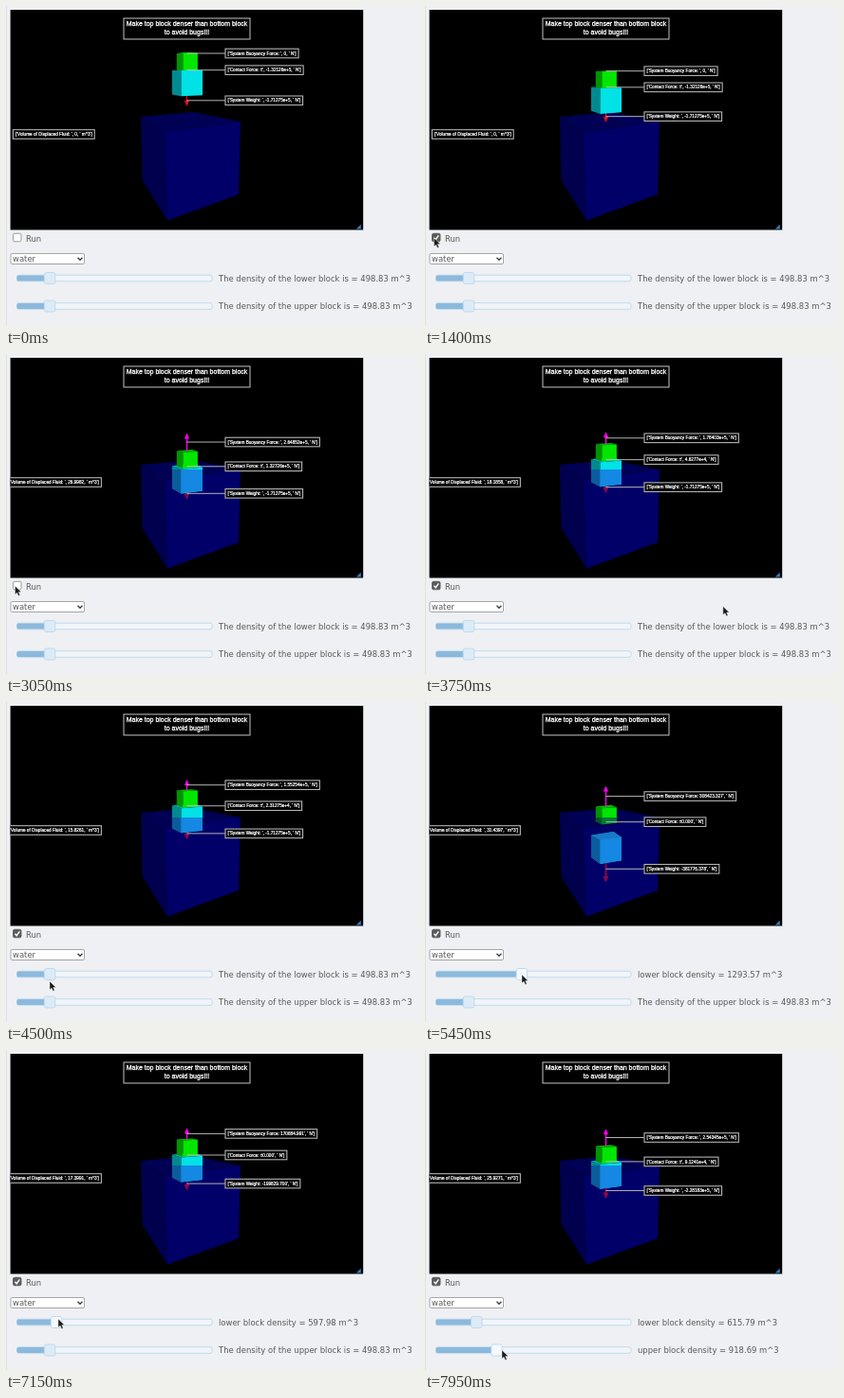
These frames come from a looping animation (435 px wide and 338 px high, 8000 ms). An HTML page:

```html
<!DOCTYPE html>
<html lang="en">
<head>
<meta charset="utf-8">
<title>Buoyancy of stacked blocks</title>
<style>
  html, body { margin: 0; width: 100%; height: 100%; overflow: hidden; background: #eff0f3; }
  svg { display: block; width: 100vw; height: 100vh; }
  .ui { font: 8.45px "DejaVu Sans", sans-serif; fill: #585858; white-space: pre; }
  .lab { font: 4.7px "Liberation Sans", sans-serif; fill: #fff; stroke: #fff; stroke-width: .24; }
  .title { font: 7px "Liberation Sans", sans-serif; fill: #fff; stroke: #fff; stroke-width: .3; text-anchor: middle; }
  .box { fill: #000; stroke: #b4b4b4; stroke-width: 1.1; }
</style>
</head>
<body>
<svg id="stage" viewBox="0 0 435 338">
  <defs>
    <clipPath id="view"><rect x="4.600" y="4" width="371.600" height="232.500"/></clipPath>
    <clipPath id="under"><rect x="5" y="122" width="371" height="115"/></clipPath>
  </defs>
  <rect width="435" height="338" fill="#eff0f3"/>
  <rect width="1" height="338" fill="#dfe0e4"/>
  <rect x="4.600" y="4" width="371.600" height="232.500"/>
  <g id="scene" clip-path="url(#view)">
    <path d="M142 117L197 112L247 122L167 133.500Z" fill="#000054"/>
    <path d="M142 117L167 133.500L170 226.500L143.500 184Z" fill="#00004e"/>
    <path d="M167 133.500L247 122L245 199L170 226.500Z" fill="#000068"/>
  </g>
  <path d="M368.800 235.500L373.800 230.700V235.500Z" fill="#2f7fc4"/>
  <g id="ui"></g>
</svg>
<script>
const LOOP = 8000, AXIS = 190.5, G = 9.81, BASE = 498.834;
const scene = document.getElementById('scene'), ui = document.getElementById('ui');

function el(parent, tag, attrs, text) {
  const e = document.createElementNS('http://www.w3.org/2000/svg', tag);
  set(e, attrs);
  if (text) e.textContent = text;
  parent.appendChild(e);
  return e;
}
function set(e, attrs) { for (const k in attrs) e.setAttribute(k, attrs[k]); }
const clamp = (v, a, b) => Math.max(a, Math.min(b, v));

const ease = {
  lin: p => p,
  cos: p => (1 - Math.cos(Math.PI * p)) / 2,
  fall: p => p * p,
  out: p => Math.sin(p * Math.PI / 2)
};
// keys: [time, value, easing into this key]
function at(keys, t, kind) {
  if (t <= keys[0][0]) return keys[0][1];
  for (let i = 1; i < keys.length; i++) {
    const [t1, b, e] = keys[i], [t0, a] = keys[i - 1];
    if (t < t1) return a + (b - a) * ease[e || kind]((t - t0) / (t1 - t0));
  }
  return keys[keys.length - 1][1];
}

// height of the lower block's top; a pause lies between 2450 and 3050
const depth = [[1140, 68], [1470, 97, 'fall'], [1750, 130, 'out'], [2140, 97], [2540, 122]];
const depthAfter = [[2740, 97], [3140, 122], [3520, 101], [3910, 118], [4300, 105], [4700, 114.96],
  [4950, 122], [5450, 142, 'fall'], [5900, 162, 'out'], [6430, 122, 'fall'], [6650, 99, 'out'],
  [6960, 118], [7350, 104.14], [7800, 121], [8150, 113.88]];
const lowerKeys = [[4750, BASE], [5350, 1293.57], [5550, 1293.57], [6400, 679], [6700, 679],
  [7150, 597.8], [7250, 615.79]];
const upperKeys = [[7720, BASE], [7950, 918.69]];
const cursorX = [[50, 378], [800, 13], [900, 13], [1000, 9.5], [3150, 9.5], [3850, 364], [4050, 390],
  [4450, 46], [4750, 46], [5350, 102], [5550, 102], [6400, 60], [6700, 60], [7150, 55], [7300, 55],
  [7600, 50], [7720, 50], [7950, 81]];
const cursorY = [[50, 289], [800, 246], [900, 246], [1000, 245], [3150, 245], [3850, 270], [4050, 310],
  [4450, 295], [4500, 295], [4720, 288], [5550, 288], [6400, 284], [7300, 284], [7600, 318], [7950, 317]];

const blockY = t => t < 3050 ? at(depth, Math.min(t, 2450), 'cos')
  : at(depthAfter, Math.max(t, 3050 + 0), 'cos');
const lowerAt = t => at(lowerKeys, t, 'lin');
const upperAt = t => at(upperKeys, t, 'lin');

function makeArrow(color, parent) { return el(parent, 'path', { fill: color }); }
function drawArrow(e, y, len) {
  const d = Math.sign(len), n = Math.abs(len);
  if (n < .3) return set(e, { d: '' });
  const tip = y + len, neck = tip - d * Math.min(6, n), w = 2.6;
  set(e, { d: `M${AXIS - .7} ${y}V${neck}H${AXIS - w}L${AXIS} ${tip}L${AXIS + w} ${neck}H${AXIS + .7}V${y}Z` });
}

function makeBlock(colors, wetColors, size) {
  const faces = (parent, cols) => cols.map(c => el(parent, 'path', { fill: c }));
  const dry = faces(scene, colors);
  const wet = faces(el(scene, 'g', { 'clip-path': 'url(#under)' }), wetColors);
  return { sets: [dry, wet], size };
}
function drawBlock({ sets, size }, top, bottom) {
  const corner = (dx, k, y) => `${AXIS + dx * size} ${y + (y - 70) * k * size}`;
  const left = y => corner(-15.5, -.02, y), front = y => corner(-6, .055, y);
  const right = y => corner(16.5, .014, y), back = y => corner(8, -.07, y);
  const shapes = [
    [left(top), back(top), right(top), front(top)],
    [left(top), front(top), front(bottom), left(bottom)],
    [front(top), right(top), right(bottom), front(bottom)]
  ];
  for (const s of sets) s.forEach((e, i) => set(e, { d: 'M' + shapes[i].join('L') + 'Z' }));
}

const weightArrow = makeArrow('#e0101c', scene);
const weightWet = makeArrow('#86094a', el(scene, 'g', { 'clip-path': 'url(#under)' }));
const lower = makeBlock(['#00b4b8', '#008a90', '#00e2e6'], ['#1a78c8', '#0b5c9c', '#1488e2'], 1);
const upper = makeBlock(['#00b800', '#009400', '#00e600'], ['#006a2c', '#005428', '#007a34'], .69);
const liftArrow = makeArrow('#ff00f0', scene);

function makeLabel(lead) {
  const line = lead && el(scene, 'path', { stroke: '#c8c8c8', 'stroke-width': .9 });
  return { line, box: el(scene, 'rect', { class: 'box', height: 9.6 }), text: el(scene, 'text', { class: 'lab' }) };
}
function drawLabel(l, y, str) {
  if (l.str !== str) {
    l.text.textContent = l.str = str;
    l.width = l.text.getComputedTextLength() + 5;
  }
  const x = l.line ? 231 : 50.3 - l.width / 2;
  set(l.box, { x, y: y - 4.8, width: l.width });
  set(l.text, { x: x + 2.5, y: y + 1.6 });
  if (l.line) set(l.line, { d: `M${AXIS} ${y}H231` });
}
const liftLabel = makeLabel(true), contactLabel = makeLabel(true), weightLabel = makeLabel(true);
const volumeLabel = makeLabel(false);
el(scene, 'rect', { class: 'box', x: 124, y: 13, width: 133, height: 22 });
el(scene, 'text', { class: 'title', x: 190.5, y: 21.2 }, 'Make top block denser than bottom block');
el(scene, 'text', { class: 'title', x: 190.5, y: 30 }, 'to avoid bugs!!!');

// controls
const check = el(ui, 'rect', { x: 7.5, y: 240.3, width: 8.5, height: 8.5, rx: 1.5, 'stroke-width': .9 });
const tick = el(ui, 'path', { d: 'M9.500 244.800L11.200 246.800L14.300 242.300', fill: 'none', stroke: '#fff', 'stroke-width': 1.4 });
el(ui, 'text', { class: 'ui', x: 21, y: 249.3 }, 'Run');
el(ui, 'rect', { x: 5, y: 261.5, width: 77.5, height: 11, rx: 1.5, fill: '#fff', stroke: '#9c9c9c', 'stroke-width': .9 });
el(ui, 'text', { class: 'ui', x: 7, y: 270 }, 'water');
el(ui, 'path', { d: 'M75.500 265.800L78 268.300L80.500 265.800', fill: 'none', stroke: '#3c3c3c', 'stroke-width': 1.3 });

function makeSlider(y) {
  el(ui, 'rect', { x: 11.5, y: y - 3.3, width: 205.5, height: 6.6, rx: 2, fill: '#f1f5f9', stroke: '#bdd8eb', 'stroke-width': .9 });
  return {
    y,
    fill: el(ui, 'rect', { x: 11.5, y: y - 3, height: 6, rx: 1.5, fill: '#8bb9dc' }),
    knob: el(ui, 'rect', { y: y - 6, width: 11.5, height: 12, rx: 2, stroke: '#bcd8ec', 'stroke-width': .9 }),
    text: el(ui, 'text', { class: 'ui', x: 224, y: y + 3.3 })
  };
}
function drawSlider(s, name, value, touched, active) {
  const x = 11 + value * .0703;
  set(s.fill, { width: x - 11.5 });
  set(s.knob, { x: x - 5.75, fill: active ? '#f4f9fd' : '#dcebf6' });
  s.text.textContent = (touched ? `${name} block density = ` : `The density of the ${name} block is = `)
    + value.toFixed(2) + ' m^3';
}
const lowerSlider = makeSlider(287.5), upperSlider = makeSlider(317);
const cursor = el(ui, 'path', {
  d: 'M0 0V9L2.100 7.200L3.600 10.400L5.200 9.700L3.800 6.600H6.600Z',
  fill: '#1c1c1c', stroke: '#fff', 'stroke-width': .4
});

const short = v => {
  const p = Number(v.toPrecision(6));
  if (Math.abs(p) < 1e4) return String(p);
  const [m, e] = p.toExponential().split('e+');
  return `${m}e+${e}`;
};

function render(t) {
  const yl = blockY(t), yu = Math.min(yl, 126.98);
  const rl = lowerAt(t - 50), ru = upperAt(t - 50);
  const volume = clamp((yl - 97.2) / .81, 0, 27) + clamp((yu - 119.1) / 1.7749, 0, 8);
  const lift = volume * 1000 * G, weight = G * (27 * rl + 8 * ru);
  const apart = rl > ru;

  const top = yu - 18 + .03 * (yu - 68);
  drawBlock(lower, yl, yl + 26 - .03 * (yl - 68));
  drawBlock(upper, top, yu);

  const foot = yl + 25.6 - .07 * (yl - 68), down = weight * 7.25e-5, up = volume * .71;
  drawArrow(weightArrow, foot, down);
  drawArrow(weightWet, foot, down);
  drawArrow(liftArrow, top, -up);

  const say = (name, sign, v) => apart
    ? `['${name}: ${sign}${v.toFixed(3)}', ' N']`
    : `['${name}: ${sign}', ${short(v)}, ' N']`;
  drawLabel(liftLabel, top - up / 2, say('System Buoyancy Force', '', lift));
  drawLabel(contactLabel, yu - .3, say('Contact Force', '±', apart ? 0 : lift - 27 * G * rl));
  drawLabel(weightLabel, foot + down / 2, say('System Weight', '', -weight));
  drawLabel(volumeLabel, 135.5, `['Volume of Displaced Fluid: ', ${short(volume)}, ' m^3']`);

  const on = (t >= 1150 && t < 2450) || t >= 3150;
  set(check, { fill: on ? '#5c5c5c' : '#fff', stroke: on ? '#5c5c5c' : '#929292' });
  set(tick, { visibility: on ? 'visible' : 'hidden' });
  drawSlider(lowerSlider, 'lower', lowerAt(t), t > 4750, t > 4700 && t < 7300);
  drawSlider(upperSlider, 'upper', upperAt(t), t > 7720, t > 7600);
  set(cursor, {
    visibility: t < 50 ? 'hidden' : 'visible',
    transform: `translate(${at(cursorX, t, 'lin')} ${at(cursorY, t, 'lin')})`
  });
}

const start = performance.now();
function tickFrame() {
  render((performance.now() - start) % LOOP);
  requestAnimationFrame(tickFrame);
}
tickFrame();
</script>
</body>
</html>
```
